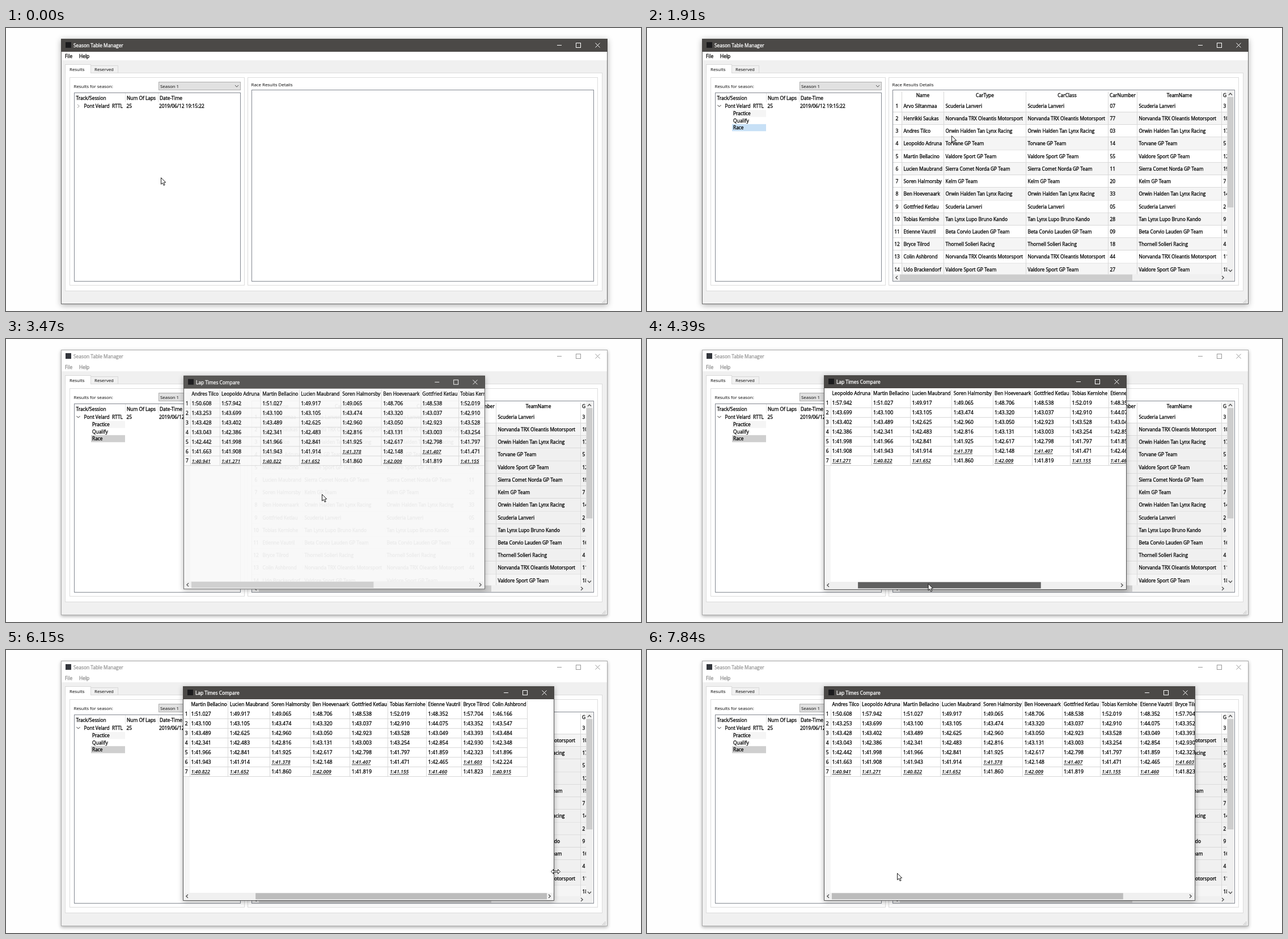
Recreate the animation shown at these times as an HTML page with a canvas. Size 1120 by 500 pixels, loop 8.07 s.

```html
<!DOCTYPE html>
<html lang="en">
<head>
<meta charset="utf-8">
<title>Season Table Manager</title>
<style>
html, body { margin: 0; width: 100%; height: 100%; overflow: hidden; background: #fefefe; }
canvas { display: block; width: 1120px; height: 500px; }
</style>
</head>
<body>
<canvas id="stage"></canvas>
<script>
const LOOP = 8070, TICK = 76.86;
const stage = document.getElementById('stage'), ctx = stage.getContext('2d');
const dpr = window.devicePixelRatio || 1;
stage.width = 1120 * dpr;
stage.height = 500 * dpr;

const FAMILY = '"Open Sans", "Noto Sans", sans-serif';
const UI = '8.4px ' + FAMILY, LABEL = '7.9px ' + FAMILY;
const LAP = '8.9px ' + FAMILY, BEST = 'italic 600 8.7px ' + FAMILY;

const entries = [
  'Arvo Siltanmaa/07/Scuderia Lanveri',
  'Henrikki Saukas/77/Norvanda TRX Oleantis Motorsport',
  'Andres Tilco/03/Orwin Halden Tan Lynx Racing',
  'Leopoldo Adruna/14/Torvane GP Team',
  'Martin Bellacino/55/Valdore Sport GP Team',
  'Lucien Maubrand/11/Sierra Comet Norda GP Team',
  'Soren Halmorsby/20/Kelm GP Team',
  'Ben Hoevenaark/33/Orwin Halden Tan Lynx Racing',
  'Gottfried Ketlau/05/Scuderia Lanveri',
  'Tobias Kernlohe/28/Tan Lynx Lupo Bruno Kando',
  'Etienne Vautril/09/Beta Corvio Lauden GP Team',
  'Bryce Tilrod/18/Thornell Solieri Racing',
  'Colin Ashbrond/44/Norvanda TRX Oleantis Motorsport',
  'Udo Brackendorf/27/Valdore Sport GP Team'].map(e => e.split('/'));
const columns = { Name: 74, CarType: 145, CarClass: 145, CarNumber: 51, TeamName: 149, Grid: 74 };

const FIRST_PICK = 2, LAST_PICK = 12;
const picked = entries.slice(FIRST_PICK, LAST_PICK + 1).map(([name], driver) => {
  ctx.font = UI;
  return { name, width: ctx.measureText(name).width + 5, laps: lapTimes(driver) };
});

// Pointer moves: start, end, x, y; it rests in between
const home = { x: 273, y: 264 };
const moves = [
  [70, 600, 125, 134], [960, 1380, 158, 171], [1690, 1915, 537, 190], [1980, 2200, 540, 405],
  [2300, 2600, 543, 269], [2770, 2910, 557, 274], [3540, 3990, 440, 432], [4080, 4640, 540, 432],
  [4750, 5130, 848, 391], [5930, 6140, 969, 391], [6200, 6700, 560, 432], [6850, 7450, 446, 429],
  [7610, 7680, 441, 394]];

const clamp = (v, a = 0, b = 1) => Math.min(b, Math.max(a, v));

function random(seed) {
  const v = Math.sin(seed * 12.9898 + 4.1) * 43758.5453;
  return v - Math.floor(v);
}

// A slow standing start, then steadily faster laps; seconds over one minute
function lapTimes(driver) {
  return Array.from({ length: 7 }, (_, i) => {
    const r = random(driver * 7 + i);
    return i ? 43.2 - .4 * i + 1.3 * r : 46 + 12 * r;
  });
}

function pointerAt(t) {
  let { x, y } = home;
  for (const [from, to, tx, ty] of moves) {
    const u = clamp((t - from) / (to - from)), e = u * u * (3 - 2 * u);
    x += (tx - x) * e;
    y += (ty - y) * e;
  }
  return { x, y };
}

function box(x, y, r, b, fill, stroke) {
  if (fill) { ctx.fillStyle = fill; ctx.fillRect(x, y, r - x, b - y); }
  if (stroke) {
    ctx.strokeStyle = stroke;
    ctx.lineWidth = 1;
    ctx.strokeRect(x + .5, y + .5, r - x - 1, b - y - 1);
  }
}

function line(color, width, ...p) {
  ctx.strokeStyle = color;
  ctx.lineWidth = width;
  ctx.beginPath();
  for (let i = 0; i < p.length; i += 2) ctx.lineTo(p[i], p[i + 1]);
  ctx.stroke();
}

function text(s, x, y, color = '#000', font = UI, align = 'left') {
  ctx.font = font;
  ctx.textAlign = align;
  ctx.fillStyle = ctx.strokeStyle = color;
  ctx.fillText(s, x, y);
  if (font === UI || font === LAP) {
    ctx.lineWidth = .3;
    ctx.strokeText(s, x, y);
  }
}

function clipped(x, y, r, b, draw) {
  ctx.save();
  ctx.beginPath();
  ctx.rect(x, y, r - x, b - y);
  ctx.clip();
  draw();
  ctx.restore();
}

// Arrow head centred at x, y; dx, dy give its direction
function chevron(x, y, dx, dy, color = '#505050', w = 1.3) {
  line(color, w, x - 2 * dx - 3 * dy, y - 2 * dy - 3 * dx, x + 1.2 * dx, y + 1.2 * dy,
    x - 2 * dx + 3 * dy, y - 2 * dy + 3 * dx);
}

function frame(x, y, r, b, fill, border, blur) {
  ctx.save();
  ctx.shadowColor = 'rgba(0,0,0,.32)';
  ctx.shadowBlur = blur * dpr;
  ctx.shadowOffsetY = 2 * dpr;
  box(x, y, r, b, fill);
  ctx.restore();
  box(x, y, r, b, null, border);
}

function titleBar(x, y, r, title, active) {
  const ink = active ? '#fff' : '#999', cy = y + 11.5, inset = active ? 0 : 1;
  box(x + inset, y + inset, r - inset, y + 23, active ? '#4b4947' : '#fff');
  box(x + 8, y + 6, x + 18, y + 16, active ? '#1b1b1d' : '#33363c');
  text(title, x + 22, y + 15, ink);
  line(ink, 1, r - 89, cy, r - 81, cy);
  box(r - 56, cy - 4.5, r - 47, cy + 4.5, null, ink);
  line(ink, 1, r - 21.5, cy - 4, r - 13.5, cy + 4);
  line(ink, 1, r - 13.5, cy - 4, r - 21.5, cy + 4);
}

function hBar(x, y, r, from, to, color) {
  box(x, y, r, y + 12, '#f0f0f0');
  box(from, y + .5, to, y + 11.5, color);
  chevron(x + 6, y + 6, -1, 0);
  chevron(r - 7, y + 6, 1, 0);
}

function tree(t, cur) {
  box(120, 114, 414, 448, '#fff', '#828790');
  text('Track/Session', 123.5, 126.5);
  text('Num Of Laps', 213, 126.5);
  text('Date-Time', 271, 126.5);
  for (const x of [210.5, 268.5]) line('#e5e5e5', 1, x, 115, x, 131);
  const open = t > 740, raceOn = t > 1440;
  const hover = cur.x > 121 && cur.x < 413 ? Math.floor((cur.y - 132) / 12.5) : -1;
  if (hover === 0) box(122, 132, 413, 145, '#e5f3ff');
  if (open) {
    chevron(127.5, 138, 0, 1, '#303030', 1);
    ['Practice', 'Qualify', 'Race'].forEach((name, i) => {
      const y = 144.8 + i * 12.5;
      let fill = i ? null : '#f5f5f5';
      if (hover === i + 1) fill = '#e5f3ff';
      if (i === 2 && raceOn) fill = t < 1970 ? '#c7e0f6' : '#cfcfcf';
      if (fill) box(150, y, 210, y + 12.5, fill);
      text(name, 152, y + 9.4);
    });
  } else chevron(128, 138, 1, 0, '#9a9a9a', 1);
  clipped(121, 131, 210, 146, () => text('Pont Velard  RTTL', 137.5, 141.2));
  text('25', 212.5, 141.2);
  text('2019/06/12 19:15:22', 270, 141.2);
}

function results(t, cur, active) {
  const top = 126.8, pitch = 22.22, rowAt = y => Math.floor((y - top) / pitch);
  const last = t < 1970 ? -1 : Math.min(LAST_PICK, t < 2230 ? rowAt(cur.y) : LAST_PICK);
  const isOn = i => i >= FIRST_PICK && i <= last;
  clipped(434, 110, 1023, 435, () => {
    entries.forEach((_, i) => {
      const y = top + i * pitch, on = isOn(i);
      if (on && active) box(434, y, 449, y + pitch, '#b9dcf4');
      box(449, y, 1023, y + pitch, on ? (active ? '#0078d7' : '#f0f0f0') : i % 2 ? '#f5f5f5' : '#fff');
      text(i + 1, 441, y + 14, '#000', UI, 'center');
      const ly = Math.round(y + pitch) - .5;
      line('#d8d8d8', 1, 434, ly, 1023, ly);
    });
    let x = 449.5;
    for (const [head, width] of Object.entries(columns)) {
      line('#d8d8d8', 1, x, 112, x, 435);
      clipped(x, 110, x + width, 435, () => {
        if (head === 'Grid') text('G', x + 2.5, 121.5);
        else text(head, x + width / 2, 121.5, '#000', UI, 'center');
        entries.forEach(([name, number, team], i) => {
          const cell = { Name: name, CarNumber: number, Grid: (i * 7 + 2) % 19 + 1 }[head] || team;
          text(cell, x + 3, top + i * pitch + 14, isOn(i) && active ? '#fff' : '#000');
        });
      });
      x += width;
    }
  });
  box(1023, 110, 1035, 447, '#f0f0f0');
  box(1023.5, 122, 1034.5, 317, '#cdcdcd');
  chevron(1029, 116.5, 0, -1);
  chevron(1029, 429, 0, 1);
  hBar(434, 435, 1023, 446, 856, '#cdcdcd');
}

function mainWindow(t, cur) {
  const active = t < 3290, ink = active ? '#000' : '#8c8c8c';
  frame(97, 19, 1061, 488, '#f0f0f0', active ? '#6a6a6a' : '#aaa', active ? 10 : 6);
  titleBar(97, 19, 1061, 'Season Table Manager', active);
  box(98, 42, 1060, 57, '#fff');
  text('File', 104, 53, ink);
  text('Help', 129, 53, ink);

  box(104, 79, 1052, 465, '#fff', '#dcdcdc');
  box(149, 66, 198, 80, '#f0f0f0', '#d9d9d9');
  box(104, 64, 150, 80, '#fff', '#d9d9d9');
  box(105, 79, 149, 81, '#fff');
  text('Results', 112, 75.5, '#000', LABEL);
  text('Reserved', 156, 76, '#000', LABEL);

  box(112, 87, 421, 455, null, '#dcdcdc');
  text('Results for season:', 119.5, 105.7, '#000', LABEL);
  box(269, 95, 414, 110, '#e1e1e1', '#adadad');
  text('Season 1', 272, 105.7, '#000', LABEL);
  chevron(407, 103, 0, 1, '#505050', 1);
  tree(t, cur);

  box(426, 87, 1044, 455, null, '#dcdcdc');
  text('Race Results Details', 432.5, 103, '#000', LABEL);
  box(433, 109, 1037, 448, '#fff', '#828790');
  if (t > 1520) results(t, cur, active);

  for (let i = 0; i < 3; i++)
    for (let j = 0; j <= i; j++) box(1056 - j * 2.2, 480 + i * 2.2, 1057.2 - j * 2.2, 481.2 + i * 2.2, '#b0b0b0');
}

function contextMenu(t) {
  const a = clamp((t - 2700) / 170) * (1 - clamp((t - 3050) / 150));
  if (!a) return;
  ctx.save();
  ctx.globalAlpha = a;
  frame(540, 264, 695, 301, '#f0f0f0', '#b8b8b8', 4);
  if (t > 2890) box(542, 266, 693, 282, '#91c9f7');
  text('Compare selected lapsTimes', 566, 277.7);
  text('Clear selection', 566, 294);
  ctx.restore();
}

// How many of the last columns fit into the width
function columnsFitting(width) {
  let n = 0;
  while (n < picked.length && (width -= picked.at(-1 - n).width) >= 0) n++;
  return n;
}

function lapTable(first, edge) {
  const rowY = i => 104.5 + i * 17.06;
  let x = 324;
  for (const { name, width, laps } of picked.slice(first)) {
    const best = Math.min(...laps), left = x + 2.5;
    text(name, x + width / 2, 99.3, '#000', UI, 'center');
    laps.forEach((s, i) => {
      const y = rowY(i) + 11.5, label = '1:' + s.toFixed(3), isBest = s === best;
      text(label, left, y, '#000', isBest ? BEST : LAP);
      if (isBest) line('#000', .8, left, y + 1.5, left + ctx.measureText(label).width, y + 1.5);
    });
    x += width;
    const lx = Math.round(x) - .5;
    line('#d8d8d8', 1, lx, 89, lx, 223);
  }
  for (let i = 1; i < 8; i++) {
    const y = Math.round(rowY(i)) - .5;
    line('#d8d8d8', 1, 313, y, Math.min(x, edge), y);
    text(i, 318.2, y - 5.2, '#000', UI, 'center');
  }
  line('#d8d8d8', 1, 324.5, 105, 324.5, 223);
}

function compareDialog(t, cur) {
  const a = clamp((t - 3300) / 173);
  if (!a) return;
  const right = t < 5900 ? 846 : t < 6200 ? clamp(cur.x - 2, 846, 967) : 967, edge = right - 1;
  const fit = columnsFitting(edge - 324), max = picked.length - fit;
  const scrolled = t < 4220 ? 0 : t < 4460 ? 1 : t < 7060 ? 2 : t < 7320 ? 1 : 0;
  const first = Math.min(scrolled, max);

  ctx.save();
  ctx.globalAlpha = a;
  ctx.translate(579, 253);
  ctx.scale(.95 + .05 * a, .95 + .05 * a);
  ctx.translate(-579, -253);
  frame(312, 64, right, 443, '#fff', '#555', 9);
  titleBar(312, 64, right, 'Lap Times Compare', true);
  box(313, 224, 324, 429, '#f6f6f6');
  clipped(313, 87, edge, 429, () => lapTable(first, edge));

  const track = right - 13 - 326, size = track * fit / picked.length;
  const from = 326 + (max ? (track - size) * first / max : 0);
  const held = (t > 4040 && t < 4740) || (t > 6800 && t < 7640);
  const color = held ? '#606060' : t < 4000 ? '#cdcdcd' : t < 5900 ? '#b3b3b3' : '#bcbcbc';
  hBar(313, 429, edge, from, from + size, color);
  ctx.restore();
}

function pointer(t, { x, y }) {
  const resizing = t > 5150 && t < 6220;
  const half = [[-8, 0], [-4, -4], [-4, -1.2], [4, -1.2], [4, -4]];
  const points = resizing ? [...half, ...half.map(([px, py]) => [-px, -py])]
    : [[0, 0], [0, 11.6], [2.7, 9.2], [4.7, 13.6], [6.6, 12.7], [4.7, 8.5], [8.2, 8.3]];
  ctx.beginPath();
  for (const [px, py] of points) ctx.lineTo(x + px + .5, y + py + .5);
  ctx.closePath();
  ctx.fillStyle = '#fff';
  ctx.strokeStyle = '#000';
  ctx.lineWidth = .9;
  ctx.fill();
  ctx.stroke();
}

function draw(now) {
  const t = Math.floor((now % LOOP) / TICK + .25) * TICK % LOOP;
  const cur = pointerAt(t);
  ctx.setTransform(dpr, 0, 0, dpr, 0, 0);
  box(0, 0, 1120, 500, '#fefefe');
  mainWindow(t, cur);
  contextMenu(t);
  compareDialog(t, cur);
  pointer(t, cur);
}

const start = performance.now();
function loop() {
  draw(performance.now() - start);
  requestAnimationFrame(loop);
}
loop();
</script>
</body>
</html>
```
